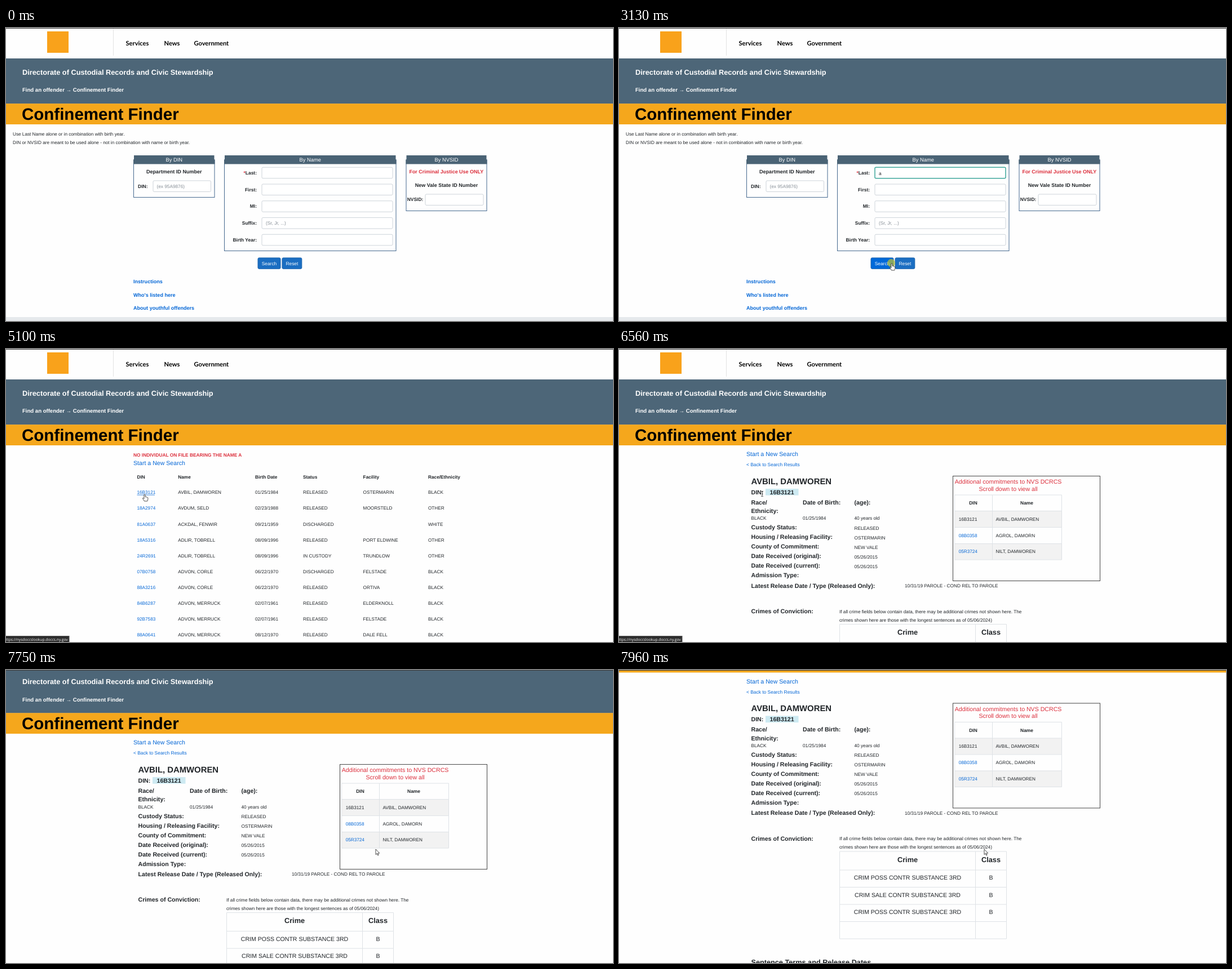
Write an HTML page that moves like this. It is 1077x520 px and loops after 8 s.

```html
<!DOCTYPE html>
<html lang="en">
<head>
<meta charset="utf-8">
<title>Confinement Finder</title>
<style>
  html, body { margin: 0; width: 100%; height: 100%; overflow: hidden; background: #fefefe; }
  svg { display: block; width: 1077px; height: 520px; }
  text {
    font-family: "Liberation Sans", Arial, sans-serif;
    fill: #212529;
    text-rendering: geometricPrecision;
    white-space: pre;
  }
  .b { font-weight: 700; }
  .w { fill: #fff; }
  .k { fill: #000; }
  .red { fill: #dc2f3c; }
  .link { fill: #0366d6; }
  .hint { fill: #868e96; }
  .nav { font-family: Lato, sans-serif; font-weight: 700; fill: #000; }
  .url { font-family: "Open Sans", "Noto Sans", sans-serif; fill: #fff; }
  .input { fill: #fff; stroke: #ced4da; }
  .card { fill: none; stroke: #45698f; }
  .grid { fill: none; stroke: #dee2e6; }
</style>
</head>
<body>
<svg viewBox="0 0 1077 520">
  <g id="doc">
    <g id="head"></g>
    <g id="form"></g>
    <g id="results"></g>
    <g id="detail"></g>
  </g>
  <rect width="1077" height="1" fill="#3a3a3a"/>
  <g id="status">
    <rect x="-2" y="509.5" width="114" height="12" fill="#2d2d2d" stroke="#555"/>
  </g>
  <circle id="click" r="7" fill="#b4bd3c" opacity=".75"/>
  <g id="cursor">
    <path id="arrow" d="M0 0V9.6L2.2 7.6L3.7 11L5.2 10.3L3.7 7.1H6.7Z" fill="#fff" stroke="#222" stroke-width=".8"/>
    <path id="beam" d="M-1.8 -4.5H-.5L0 -4L.5 -4.5H1.8M0 -4V4M-1.8 4.5H-.5L0 4L.5 4.5H1.8" fill="none" stroke="#333" stroke-width=".9"/>
    <path id="hand" d="M-1.1 .6Q0 -.8 1.1 .6V4.4Q2.2 3.6 2.9 4.9Q4 4.2 4.5 5.4Q5.6 5 5.8 6.4V8.6Q5.6 10 4.8 12H-.6Q-1.6 9.6 -3.4 7.8Q-3.9 6.2 -2.4 6.4L-1.1 7.7Z" fill="#fff" stroke="#222" stroke-width=".8"/>
  </g>
</svg>
<script>
const LOOP = 8000;
const $ = id => document.getElementById(id);

// Text placed by the middle of its capitals
const text = (x, y, str, size = 8.25, cls = '', anchor = 'start') =>
  `<text x="${x}" y="${y + .36 * size}" font-size="${size}" class="${cls}" text-anchor="${anchor}">${str}</text>`;
const mid = (x, y, str, size, cls) => text(x, y, str, size, cls, 'middle');
const rect = (x, y, w, h, attrs) => `<rect x="${x}" y="${y}" width="${w}" height="${h}" ${attrs}/>`;
const input = (x, y, w, id = '') => rect(x + .5, y + .5, w - 1, 19.5, `rx="2" class="input" id="${id}"`);
const line = d => `<path d="${d}" class="grid"/>`;

function card(x, w, bottom, title) {
  return rect(x + .5, 234, w - 1, bottom - 234, 'class="card"')
    + rect(x + 1, 226, w - 2, 9, 'fill="#4a6375"')
    + rect(x, 233.5, w, 8, 'fill="#4a6375"')
    + mid(x + w / 2, 233.7, title, 9.35, 'w');
}

function button(id, x, w, label) {
  return rect(x + .5, 407.9, w - 1, 19.4, `rx="2" id="${id}" fill="#1b6ec2" stroke="#1861ac"`)
    + mid(x + w / 2, 417.6, label, 8.4, 'w');
}

$('head').innerHTML =
  rect(73, 6, 38, 38, 'fill="#f9a21b"')
  + rect(190, 0, 1, 49, 'fill="#e2e2e2"')
  + text(212.5, 27.5, 'Services', 11.1, 'nav')
  + text(280.5, 27.5, 'News', 11.1, 'nav')
  + text(333.5, 27.5, 'Government', 11.1, 'nav')
  + rect(0, 54, 1077, 80.5, 'fill="#4d6678"')
  + rect(0, 134.2, 1077, 36.8, 'fill="#f5a71c"')
  + text(29, 78, 'Directorate of Custodial Records and Civic Stewardship', 12.75, 'b w')
  + text(29, 110, 'Find an offender → Confinement Finder', 9.57, 'b w')
  + text(28, 152.8, 'Confinement Finder', 29.5, 'b k');

const FIELDS = ['<tspan class="red">*</tspan>Last:', 'First:', 'MI:', 'Suffix:', 'Birth Year:'];
const FIELD_STEP = 29.75;

$('form').innerHTML =
  text(12, 188.3, 'Use Last Name alone or in combination with birth year.', 8.2)
  + text(12, 203.5, 'DIN or NVSID are meant to be used alone - not in combination with name or birth year.', 8.2)
  + card(226, 144.5, 300.5, 'By DIN')
  + mid(298.3, 254.7, 'Department ID Number', 9.05, 'b')
  + text(234, 280.7, 'DIN:', 8.5, 'b')
  + input(260.5, 270.5, 103.5)
  + text(267.5, 281, '(ex 95A9876)', 8.25, 'hint')
  + card(387, 305.5, 395.5, 'By Name')
  + FIELDS.map((label, i) => text(445, 256.8 + FIELD_STEP * i, label, 8.45, 'b', 'end')
      + input(453.5, 246.8 + FIELD_STEP * i, 233, 'field' + i)).join('')
  + text(461, 346.2, '(Sr, Jr, ...)', 8.25, 'hint')
  + '<g id="typed">' + text(461, 257.5, 'a', 8.4) + '</g>'
  + rect(461, 252, 1, 10, 'id="caret" fill="#333"')
  + card(709.5, 144, 324.5, 'By NVSID')
  + mid(781.3, 254.7, 'For Criminal Justice Use ONLY', 8.97, 'b red')
  + mid(781.6, 278.6, 'New Vale State ID Number', 9, 'b')
  + text(711.7, 304.3, 'NVSID:', 8.45, 'b')
  + input(743.5, 294.5, 104)
  + rect(445.5, 406.4, 43.5, 22.6, 'id="ring" rx="3" fill="#8fbce8"')
  + button('search', 446.5, 41, 'Search')
  + button('reset', 489.5, 35.8, 'Reset')
  + ['Instructions', "Who's listed here", 'About youthful offenders']
      .map((str, i) => text(226, 449.6 + 23.7 * i, str, 9.05, 'b link')).join('')
  + rect(0, 513, 1077, 7, 'fill="#e6e9ec"');

const COLS = [232.5, 305.3, 442, 527, 633.6, 749];
const ROWS = `16B3121|AVBIL, DAMWOREN|01/25/1984|RELEASED|OSTERMARIN|BLACK
18A2974|AVDUM, SELD|02/23/1988|RELEASED|MOORSTELD|OTHER
81A0637|ACKDAL, FENWIR|09/21/1959|DISCHARGED||WHITE
18A5316|ADLIR, TOBRELL|08/09/1996|RELEASED|PORT ELDWINE|OTHER
24R2691|ADLIR, TOBRELL|08/09/1996|IN CUSTODY|TRUNDLOW|OTHER
07B0758|ADVON, CORLE|06/22/1970|DISCHARGED|FELSTADE|BLACK
88A3216|ADVON, CORLE|06/22/1970|RELEASED|ORTIVA|BLACK
84B6287|ADVON, MERRUCK|02/07/1961|RELEASED|ELDERKNOLL|BLACK
92B7583|ADVON, MERRUCK|02/07/1961|RELEASED|FELSTADE|BLACK
88A0641|ADVON, MERRUCK|08/12/1970|RELEASED|DALE FELL|BLACK`.split('\n').map(r => r.split('|'));

$('results').innerHTML =
  text(226, 188.3, 'NO INDIVIDUAL ON FILE BEARING THE NAME A', 8.35, 'b red')
  + text(226, 201.7, 'Start a New Search', 10.6, 'link')
  + ['DIN', 'Name', 'Birth Date', 'Status', 'Facility', 'Race/Ethnicity']
      .map((str, i) => text(COLS[i], 227, str, 8.25, 'b')).join('')
  + ROWS.map((row, r) => row.map((str, c) =>
      text(COLS[c], 254.5 + 28.03 * r, str, 8.2, c ? '' : 'link')).join('')).join('')
  + rect(232.5, 258.6, 31.5, .8, 'id="under" fill="#0366d6"');

const FACTS = [
  ['Custody Status:', 'RELEASED'],
  ['Housing / Releasing Facility:', 'OSTERMARIN'],
  ['County of Commitment:', 'NEW VALE'],
  ['Date Received (original):', '05/26/2015'],
  ['Date Received (current):', '05/26/2015'],
  ['Admission Type:', '']
];
const KIN = [['16B3121', 'AVBIL, DAMWOREN'], ['08B0358', 'AGROL, DAMORN'], ['05R3724', 'NILT, DAMWOREN']];
const KIN_TOP = 287.7, KIN_STEP = 28.7;
const CRIMES = ['CRIM POSS CONTR SUBSTANCE 3RD', 'CRIM SALE CONTR SUBSTANCE 3RD', 'CRIM POSS CONTR SUBSTANCE 3RD'];
const label = (x, y, str) => text(x, y, str, 10.62, 'b');

$('detail').innerHTML =
  text(226, 186.5, 'Start a New Search', 10.6, 'link')
  + text(226, 205.3, '&lt; Back to Search Results', 8.42, 'link')
  + text(234.5, 234.3, 'AVBIL, DAMWOREN', 14.87, 'b')
  + label(234.5, 254, 'DIN:')
  + rect(260, 248, 58.5, 11.7, 'fill="#cdeaf2"')
  + label(267.5, 254, '16B3121')
  + label(234.5, 272, 'Race/') + label(326, 272, 'Date of Birth:') + label(417.5, 272, '(age):')
  + label(234.5, 287.3, 'Ethnicity:')
  + text(234.5, 300.5, 'BLACK') + text(326, 300.5, '01/25/1984') + text(417.5, 300.5, '40 years old')
  + FACTS.map(([name, value], i) => label(234.5, 316.6 + 17 * i, name)
      + text(417.5, 318 + 17 * i, value)).join('')
  + label(234.5, 419.7, 'Latest Release Date / Type (Released Only):')
  + text(507, 420.3, '10/31/19 PAROLE - COND REL TO PAROLE')
  + rect(592.5, 225.5, 261, 186, 'fill="none" stroke="#444"')
  + mid(690.6, 235.4, 'Additional commitments to NVS DCRCS', 10.6, 'red')
  + mid(690.6, 247.8, 'Scroll down to view all', 10.6, 'red')
  + mid(628.5, 273.3, 'DIN', 8.4, 'b') + mid(723.5, 273.3, 'Name', 8.4, 'b')
  + KIN.map(([din, name], i) => rect(595.5, KIN_TOP + KIN_STEP * i, 190, KIN_STEP, `id="kin${i}"`)
      + text(602.7, 302 + KIN_STEP * i, din, 8.2, i ? 'link' : '')
      + text(668.5, 302 + KIN_STEP * i, name, 8.2)).join('')
  + line('M595.5 259V374H785.5V259ZM662.5 259V374M595.5 287.5H785.5M595.5 316.5H785.5M595.5 345.5H785.5')
  + label(234.5, 465.3, 'Crimes of Conviction:')
  + text(391, 465.6, 'If all crime fields below contain data, there may be additional crimes not shown here. The', 8.23)
  + text(391, 481, 'crimes shown here are those with the longest sentences as of 05/06/2024)', 8.23)
  + line('M391.5 488.5V643.5H687.5V488.5ZM632.5 488.5V643.5'
      + [521.5, 552, 582.5, 613].map(y => `M391.5 ${y}H687.5`).join(''))
  + mid(512, 502.6, 'Crime', 12.75, 'b') + mid(660, 502.6, 'Class', 12.75, 'b')
  + CRIMES.map((str, i) => mid(512, 535 + 30.3 * i, str, 10.55)
      + mid(660, 535 + 30.3 * i, 'B', 10.55)).join('')
  + text(234.5, 684.8, 'Sentence Terms and Release Dates', 12.7, 'b');

$('status').innerHTML += text(109.7, 515.5, 'https://nysdoccslookup.doccs.ny.gov', 6.7, 'url', 'end');

// [time, x, y]
const PATH = [
  [110, 941, 495], [740, 499, 262], [1680, 499, 262], [2360, 512, 423], [2430, 512, 423],
  [2980, 484, 418], [4210, 484, 418], [5030, 246, 258], [5430, 246, 258], [5560, 248, 258],
  [6330, 248, 258], [6400, 254, 257], [6580, 254, 257], [7120, 716, 319], [7400, 716, 319],
  [7750, 656, 318], [7960, 648, 318]
];
// [time, offset]
const SCROLL = [[7330, 0], [7400, 22], [7540, 51], [7610, 57.5], [7750, 57.5], [7820, 86], [7890, 129], [7960, 166.5]];
const CLICKS = [940, 3130, 5890];

const smooth = u => u * u * (3 - 2 * u);
const linear = u => u;
const within = (v, a, b) => v >= a && v < b;
const show = (id, on) => $(id).setAttribute('visibility', on ? 'inherit' : 'hidden');
const set = (id, name, value) => $(id).setAttribute(name, value);

function sample(keys, t, ease) {
  const n = keys.findIndex(k => k[0] > t);
  if (n === 0) return keys[0].slice(1);
  if (n < 0) return keys[keys.length - 1].slice(1);
  const a = keys[n - 1], b = keys[n];
  const u = ease((t - a[0]) / (b[0] - a[0]));
  return a.slice(1).map((v, i) => v + (b[i + 1] - v) * u);
}

function cursorShape(page, x, y, t) {
  if (page === 'form') {
    if (within(y, 407, 428) && within(x, 447, 525)) return 'hand';
    const inField = within(x, 454, 687) && within(y, 247, 386) && (y - 247) % FIELD_STEP < 20;
    return inField ? 'beam' : 'arrow';
  }
  if (page === 'results') return within(x, 232, 265) && within(y, 250, 263) ? 'hand' : 'arrow';
  return t < 6640 ? 'beam' : 'arrow';
}

function render(t) {
  const page = t < 3950 ? 'form' : t < 6370 ? 'results' : 'detail';
  const [x, y] = sample(PATH, t, smooth);
  const [scroll] = sample(SCROLL, t, linear);
  const shape = cursorShape(page, x, y, t);

  ['form', 'results', 'detail'].forEach(id => show(id, id === page));
  set('doc', 'transform', `translate(0 ${-scroll})`);

  const focus = within(t, 940, 3200) ? Math.min(1, (t - 900) / 150) : 0;
  $('field0').style.stroke = focus ? `color-mix(in srgb, #3fa79c ${focus * 100}%, #ced4da)` : '';
  $('field0').style.strokeWidth = 1 + .5 * focus;
  show('typed', page === 'form' && t >= 1610);
  const caretOn = within(t, 940, 1470) || (within(t, 1610, 3200) && (t - 1610) % 1000 < 500);
  show('caret', page === 'form' && caretOn);
  set('caret', 'x', t < 1610 ? 461 : 467);
  show('ring', page === 'form' && t >= 3200);
  set('search', 'fill', shape === 'hand' && x < 488 ? '#0069d9' : '#1b6ec2');
  set('reset', 'fill', shape === 'hand' && x >= 489 ? '#0069d9' : '#1b6ec2');

  show('under', page === 'results' && shape === 'hand');
  show('status', within(t, 4960, 6700));

  KIN.forEach((_, i) => {
    const top = KIN_TOP + KIN_STEP * i - scroll;
    const over = within(x, 595, 786) && within(y, top, top + KIN_STEP);
    set('kin' + i, 'fill', over ? '#ececec' : i % 2 ? '#fefefe' : '#f2f2f2');
  });

  show('cursor', t >= 110);
  set('cursor', 'transform', `translate(${x} ${y})`);
  ['arrow', 'beam', 'hand'].forEach(id => show(id, t >= 110 && id === shape));
  show('click', CLICKS.some(c => within(t, c, c + 140)));
  set('click', 'cx', x - 1);
  set('click', 'cy', y - 1);
}

const start = performance.now();
function frame() {
  render((performance.now() - start) % LOOP);
  requestAnimationFrame(frame);
}
frame();
</script>
</body>
</html>
```
